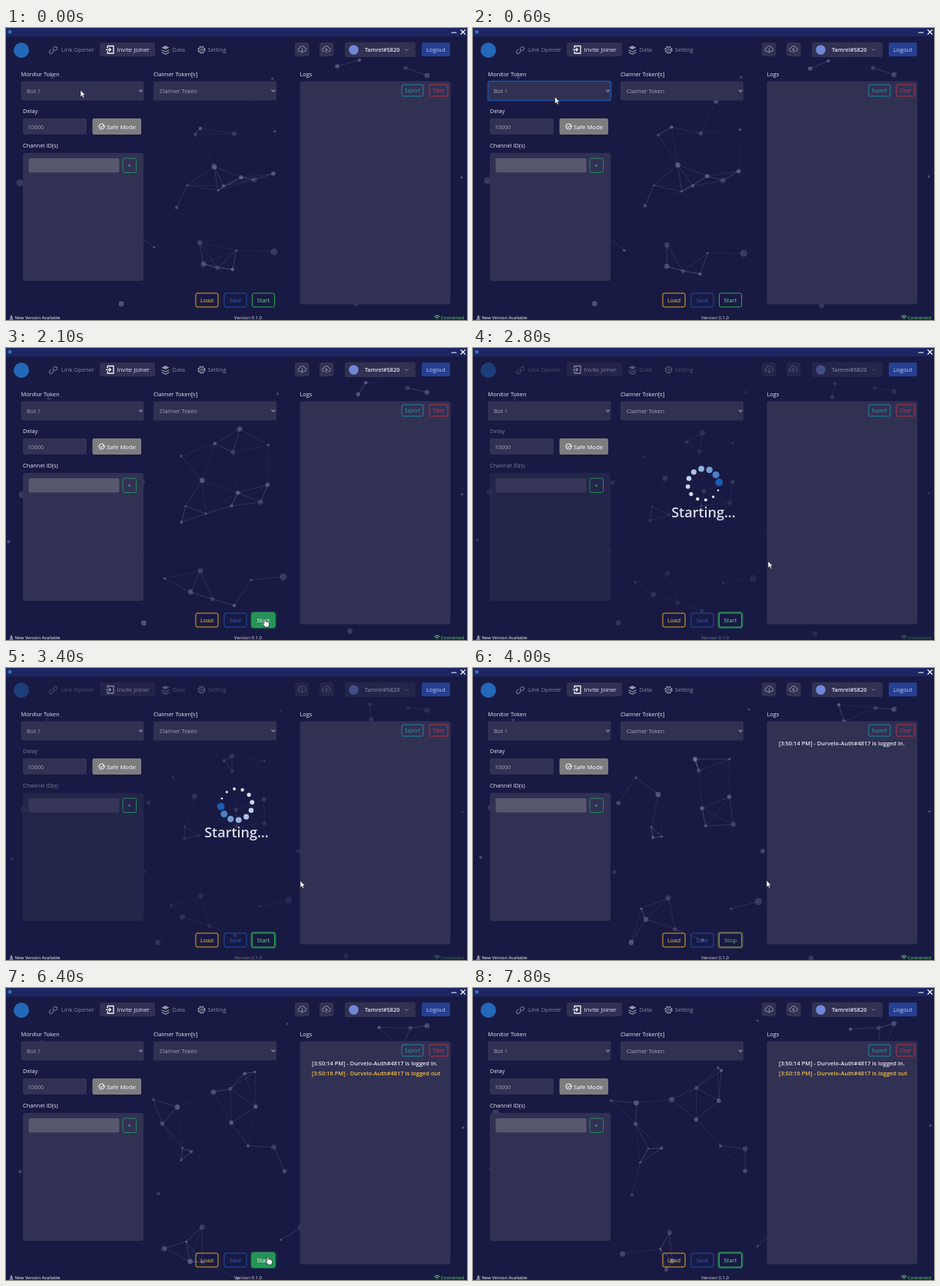
An HTML page with a canvas for the animation above (7900 ms loop, 600x381 px).

```html
<!DOCTYPE html>
<html lang="en">
<head>
<meta charset="utf-8">
<title>Invite Joiner</title>
<style>
  html, body { margin: 0; width: 100%; height: 100%; overflow: hidden; background: #191a43; }
  #net, #ui { position: absolute; left: 0; top: 0; width: 600px; height: 381px; }
  text { font-family: "Open Sans", "Noto Sans", sans-serif; font-size: 7.4px; fill: #e4e5f0; }
  .mid { text-anchor: middle; }
  .mute { fill: #85879c; font-size: 7.5px; }
  .field { fill: #a3a4b8; }
  .small { font-size: 6px; }
  .log { font-size: 7.45px; font-weight: 600; }
  .panel { fill: #313153; }
  .line { fill: none; stroke: #8d8fa4; stroke-width: 1; stroke-linecap: round; stroke-linejoin: round; }
  .btn { fill: none; stroke-width: 1; }
</style>
</head>
<body>
<canvas id="net" width="600" height="381"></canvas>
<svg id="ui" viewBox="0 0 600 381">
  <rect width="600" height="11" fill="#1d2563"/>
  <circle cx="5" cy="5" r="2.5" fill="#2d70bd"/>
  <path class="line" style="stroke:#fff;stroke-width:1.2" d="M580 6h6M592 2.5l5.5 5.5m0-5.5L592 8"/>

  <g class="dim">
    <circle cx="20" cy="29" r="10" fill="#2367b8"/>
    <path class="line" d="M61 27l2-2a2 2 0 0 1 3 3l-2 2M62.500 28l-1 .5M62 31l-2 2a2 2 0 0 1-3-3l2-2M61 30.500l2-2"/>
    <text class="mute" x="72" y="31">Link Opener</text>
    <rect x="122" y="19" width="72" height="18" rx="2" fill="#303054"/>
    <path class="line" style="stroke:#f2f2f7;stroke-width:1.300" d="M132 26v-2.500h8v9.500h-8v-2.500M130.500 28.300h6m-2-2l2 2-2 2"/>
    <text x="144.500" y="30.500" style="font-size:7.700px">Invite Joiner</text>
    <path fill="#9495a7" d="M207.500 23l5 2.500-5 2.500-5-2.500zM202.500 28l5 2.500 5-2.500v1.300l-5 2.500-5-2.500zM202.500 31l5 2.500 5-2.500v1.300l-5 2.500-5-2.500z"/>
    <text class="mute" x="216.500" y="30.500">Data</text>
    <circle class="line" cx="254.500" cy="28.500" r="4.300" stroke-dasharray="2.200 1.180" style="stroke-width:1.600;stroke-linecap:butt"/>
    <circle class="line" cx="254.500" cy="28.500" r="3.700"/>
    <circle class="line" cx="254.500" cy="28.500" r="1.500"/>
    <text class="mute" x="262.500" y="30.500">Setting</text>
    <g id="clouds"></g>
    <rect class="panel" x="441" y="18.500" width="92" height="19.500" rx="2"/>
    <circle cx="452.500" cy="28.500" r="6.300" fill="#7087d8"/>
    <text x="467" y="31" style="font-size:7.300px;font-weight:600">Tamrel#5820</text>
    <path class="line" d="M519.500 27.500l2 2 2-2"/>
  </g>
  <rect x="541" y="19" width="37" height="18" rx="2" fill="#253f91"/>
  <text class="mid" x="559.500" y="31" style="fill:#c3cbe8;font-size:7.700px">Logout</text>

  <text x="19.500" y="62.500">Monitor Token</text>
  <rect id="pick" class="panel" x="19.500" y="69.500" width="160" height="25" rx="2"/>
  <text class="field" x="27" y="85">Bot 1</text>
  <path class="line" style="stroke-width:1.200" d="M173.500 81l2 2 2-2M346 81l2 2 2-2"/>
  <text x="192" y="62.500">Claimer Token[s]</text>
  <rect class="panel" x="192" y="69.500" width="160" height="25" rx="2"/>
  <text class="field" x="200" y="85">Claimer Token</text>
  <path class="line" style="stroke-width:1.200" d="M346 81l2 2 2-2"/>

  <g class="dim">
    <text x="22" y="111">Delay</text>
    <text x="22" y="155.500">Channel ID(s)</text>
    <rect class="panel" x="22" y="163" width="157" height="167" rx="3"/>
    <rect x="29.500" y="170" width="118" height="18.500" rx="2" fill="#57586f"/>
  </g>
  <rect class="panel" x="22" y="118" width="83" height="21" rx="2"/>
  <text class="field" x="28" y="131.500">10000</text>
  <rect x="112.500" y="118" width="63.500" height="21" rx="2" fill="#7d7d7f"/>
  <circle class="line" cx="124.500" cy="128.500" r="3.600" style="stroke:#fff"/>
  <path class="line" style="stroke:#fff" d="M122.800 128.500l1.300 1.400 2.600-3"/>
  <text x="131" y="131.500" style="fill:#fff;font-size:7.700px">Safe Mode</text>
  <rect class="btn" x="152" y="170" width="17.500" height="18.500" rx="2" stroke="#24885a"/>
  <text class="mid" x="160.700" y="182" style="fill:#62cf8e">+</text>

  <text x="382.500" y="62.500">Logs</text>
  <rect class="panel" x="382.500" y="69.500" width="196" height="291" rx="3"/>
  <g id="buttons"></g>
  <text id="in" class="log" x="398" y="100.500">[3:50:14 PM] - Durvelo-Auth#4817 is logged in.</text>
  <text id="out" class="log" x="398" y="113.500" style="fill:#f2bd45">[3:50:16 PM] - Durvelo-Auth#4817 is logged out</text>

  <rect id="ring" x="319.500" y="345" width="31" height="20" rx="3" fill="none" stroke-width="2.200" stroke-opacity=".55"/>
  <rect id="run" x="320.500" y="346" width="29" height="18" rx="2"/>
  <text id="runText" class="mid" x="335" y="358" style="font-size:7.600px">Start</text>

  <path class="line" style="stroke:#fff;stroke-width:.8" d="M7 375v3.500m-1.500-1.500l1.500 1.500 1.500-1.500M5 380h4"/>
  <text x="11.500" y="379.500" style="fill:#fff;font-size:5.750px;font-weight:500">New Version Available</text>
  <g class="dim">
    <text class="small mid" x="315" y="379.500">Version 0.1.0</text>
    <path class="line" style="stroke:#5be25c" d="M557.500 376.500q3.500-3 7 0M559 378q2-1.700 4 0M561 379.500v.1"/>
    <text class="small" x="566" y="379.500" style="fill:#5be25c">Connected</text>
  </g>

  <g id="wait">
    <g id="dots"></g>
    <text class="mid" x="300" y="221" style="font-size:18px;font-weight:600;fill:#d9dbe8">Starting...</text>
  </g>
  <path id="arrow" fill="#fff" stroke="#15152c" stroke-width=".6" d="M0 0v9l2-1.800 1.400 3 1.500-.7-1.400-2.900h2.700z"/>
  <path id="hand" fill="#fff" stroke="#15152c" stroke-width=".6" d="M-1 0q1-1 1.800 0v3.200q1-.8 1.700.3 1-.6 1.600.5 1.300-.4 1.400 1v2.500L4.500 10H.3L-3 5.800q0-1.300 1.200-.9l.8.8z"/>
</svg>
<script>
const LOOP = 7900, STEP = 100, LINK = 62;
const $ = id => document.getElementById(id);
const net = $("net"), ctx = net.getContext("2d");

// x, y and drift in pixels per second
const nodes = [
  [349,292,5.6,3.2], [222,234,3,-3.2], [348,190,-3.6,-5.5], [323,198,4,1.5],
  [276,212,-7.5,2], [253,131,9,-3], [297,138,-.8,-1], [321,91,-8,7],
  [350,135,-4,-4], [246,139,-8.5,1], [165,175,6,.3], [271,181,-7.5,-4],
  [236,205,-1,.6], [283,206,5,0], [306,195,-2,-3], [252,280,.5,5],
  [300,290,9,6], [295,315,1,10], [275,313,-3,7], [257,308,-8,5],
  [193,286,6.5,7], [160,262,6,1], [401,239,-6,0], [150,360,14,-.5],
  [18,202,1.5,-5], [-4,259,3.5,-3], [431,50,13,5], [456,359,-4,5],
  [347,66,3,-3], [460,42,4,1.5], [520,52,1,0], [548,62,0,-2],
  [593,195,.3,-2], [60,64,-2,1]
];

// time, x, y of the pointer tip
const path = [
  [0,97,81], [500,97,81], [1400,377,338], [1900,337,354], [2300,337,354],
  [2800,384,278], [4000,382,277], [4800,382,277], [5500,339,308],
  [5800,341,351], [6700,341,351], [7200,334,392], [LOOP,334,392]
];

const GREEN = [42,168,92], RED = [214,48,64], WHITE = [255,255,255];
const ramp = (t, a, b) => Math.max(0, Math.min(1, (t - a) / (b - a)));
const mix = (a, b, k) => a.map((v, i) => Math.round(v + (b[i] - v) * k));
const rgb = c => `rgb(${c})`;
const show = (id, on) => $(id).setAttribute("visibility", on ? "visible" : "hidden");

$("clouds").innerHTML = [[376, "M385.500 27v5m-1.600-1.500l1.600 1.600 1.600-1.600", 0], [408, "M385.500 32v-5m-1.600 1.500l1.600-1.600 1.600 1.600", 31.5]]
  .map(([x, d, dx]) => `<rect class="panel" x="${x}" y="19" width="18.500" height="18" rx="3"/>
    <g transform="translate(${dx} 0)"><path class="line" d="M383 30.500h-1a2 2 0 0 1 0-4 3.500 3.500 0 0 1 6.800-.5 2.300 2.300 0 0 1 .2 4.500h-1"/><path class="line" d="${d}"/></g>`).join("");

$("buttons").innerHTML = [
  ["Export",515,74,28,15,"#1b8798","#249fb0",6.4], ["Clear",551,74,24,15,"#b52f45","#c53a4c",6.3],
  ["Load",247,346,29,18,"#dda81f","#f5c13c",7.4], ["Save",284,346,29,18,"#1d4fa8","#245fc4",7.4]
].map(([s, x, y, w, h, edge, ink, size]) => `<rect class="btn" x="${x}" y="${y}" width="${w}" height="${h}" rx="2" stroke="${edge}"/>
  <text class="mid" x="${x + w / 2}" y="${y + h / 2 + size * .38}" style="fill:${ink};font-size:${size}px">${s}</text>`).join("");

const dots = Array.from({ length: 12 }, (_, i) => {
  const c = document.createElementNS("http://www.w3.org/2000/svg", "circle");
  const a = (i * 30 - 8) * Math.PI / 180;
  c.setAttribute("cx", 300 + 20.5 * Math.cos(a));
  c.setAttribute("cy", 178 + 20.5 * Math.sin(a));
  return $("dots").appendChild(c);
});

function drawNet(t) {
  ctx.clearRect(0, 0, 600, 381);
  ctx.save();
  ctx.beginPath();
  ctx.rect(0, 38, 600, 343);
  ctx.clip();
  const pts = nodes.map(([x, y, vx, vy]) => [x + vx * t / 1000, y + vy * t / 1000]);
  ctx.lineWidth = .7;
  pts.forEach(([x, y], i) => {
    for (let j = 0; j < i; j++) {
      const d = Math.hypot(x - pts[j][0], y - pts[j][1]);
      if (d > LINK) continue;
      ctx.strokeStyle = `rgba(190,193,215,${.5 * (1 - d / LINK)})`;
      ctx.beginPath();
      ctx.moveTo(x, y);
      ctx.lineTo(...pts[j]);
      ctx.stroke();
    }
    ctx.fillStyle = `rgba(165,168,200,${.22 + i % 3 * .08})`;
    ctx.beginPath();
    ctx.arc(x, y, i % 24 ? 1.6 + i * 5 % 4 * .6 : 4.6, 0, 7);
    ctx.fill();
  });
  ctx.restore();
}

function drawPointer(t) {
  const i = path.findIndex(p => p[0] > t), a = path[i - 1], b = path[i];
  let k = ramp(t, a[0], b[0]);
  k = k * k * (3 - 2 * k);
  const x = a[1] + (b[1] - a[1]) * k, y = a[2] + (b[2] - a[2]) * k;
  const over = x > 320 && x < 350 && y > 346 && y < 364;
  for (const id of ["arrow", "hand"]) {
    $(id).setAttribute("transform", `translate(${x} ${y})`);
    show(id, over === (id === "hand"));
  }
}

function drawRun(t) {
  const red = ramp(t, 3900, 4100) - ramp(t, 6250, 6400);
  const hover = ramp(t, 1800, 1950) - ramp(t, 2300, 2450) + ramp(t, 5650, 5800) - ramp(t, 6750, 6900);
  const tone = mix(GREEN, RED, red);
  tone[1] += Math.round(100 * red * (1 - red));
  const ink = mix(mix([98,220,150], tone, red), WHITE, hover);
  $("run").style.cssText = `fill:${rgb(tone)};fill-opacity:${hover * .85};stroke:${rgb(tone)}`;
  $("ring").setAttribute("stroke", rgb(tone));
  $("runText").style.fill = rgb(ink);
  $("runText").textContent = t >= 3900 && t < 6300 ? "Stop" : "Start";
  show("ring", t >= 2100);
}

function drawWait(t) {
  const busy = t >= 2400 && t < 3900;
  show("wait", busy);
  net.style.opacity = busy ? .45 : 1;
  document.querySelectorAll(".dim").forEach(g => g.style.opacity = busy ? .48 : 1);
  const head = Math.floor((t - 2800) / STEP);
  dots.forEach((c, i) => {
    const k = ((i - head - 1) % 12 + 12) % 12;
    c.setAttribute("r", 1.3 + k * .32);
    c.setAttribute("fill", rgb(mix([222,232,245], [26,94,182], Math.pow(k / 11, 3))));
  });
}

function draw(t) {
  drawNet(t);
  drawWait(t);
  drawRun(t);
  drawPointer(t);
  $("pick").style.cssText = t >= 400 && t < 2100 ? "stroke:#1d4ea3;stroke-width:1.6" : "";
  show("in", t >= 3900);
  show("out", t >= 6300);
}

const start = performance.now();
function tick() {
  const ms = Math.max(0, performance.now() - start) % LOOP;
  draw(Math.floor(ms / STEP) * STEP);
  requestAnimationFrame(tick);
}
tick();
</script>
</body>
</html>
```
